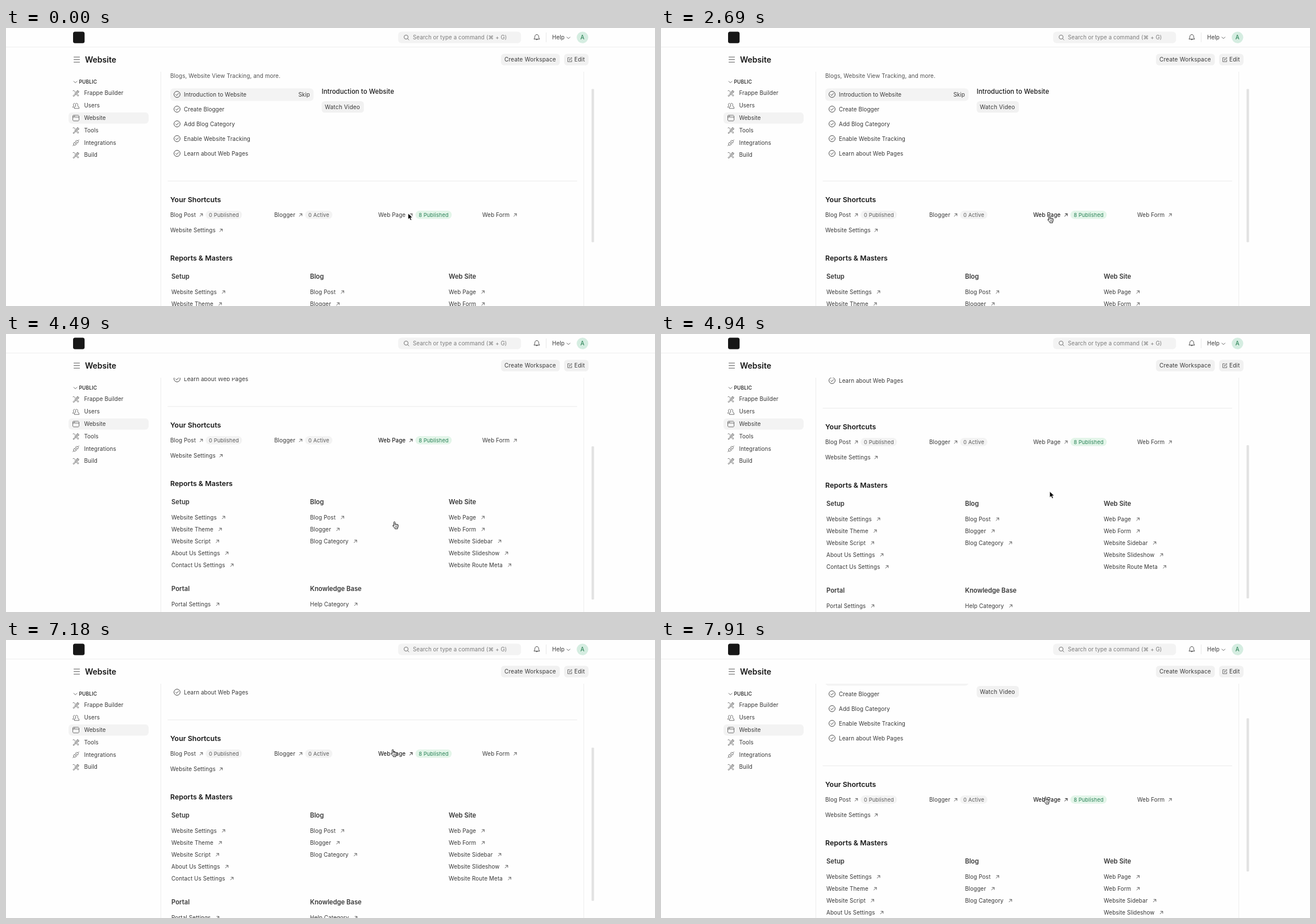
An HTML page for the animation above (8000 ms loop, 1142 px wide and 490 px high).

```html
<!DOCTYPE html>
<html lang="en">
<head>
<meta charset="utf-8">
<title>Website workspace</title>
<style>
  html, body { margin: 0; width: 100%; height: 100%; overflow: hidden; background: #fefefe; }
  svg { display: block; width: 100vw; height: 100vh; }
  text { font-family: Inter, "Noto Sans", sans-serif; white-space: pre; }
</style>
</head>
<body>
<svg id="stage" viewBox="0 0 1142 490" xmlns="http://www.w3.org/2000/svg"></svg>
<script>
const LOOP = 8000, STEP = 149.3;
const INK = '#383838', DARK = '#171717', PALE = '#f3f3f3', LINE = '#ebebeb';
const BODY = { size: 9.85, weight: 420, fill: INK, spacing: 0.1, anchor: 'start' };
const STRONG = { weight: 440 };
const BADGE = { size: 9.25, weight: 440, spacing: 0.12 };

// Text is placed by its left edge and the middle of its capitals.
function label(x, y, string, style) {
  const { size, weight, fill, spacing, anchor } = { ...BODY, ...style };
  return `<text x="${x}" y="${y + size * 0.365}" font-size="${size}" font-weight="${weight}" ` +
    `fill="${fill}" letter-spacing="${spacing}" text-anchor="${anchor}">${string}</text>`;
}

const pen = document.createElement('canvas').getContext('2d');
function textWidth(string, style) {
  const { size, weight, spacing } = { ...BODY, ...style };
  pen.font = `${weight} ${size * 10}px Inter, "Noto Sans", sans-serif`;
  return pen.measureText(string).width / 10 + string.length * spacing;
}

const heading = (x, y, string, size) =>
  label(x, y, string, { size, weight: 600, fill: size > 12 ? DARK : INK, spacing: 0 });
const box = (x, y, w, h, r, fill) =>
  `<rect x="${x}" y="${y}" width="${w}" height="${h}" rx="${r}" fill="${fill}"/>`;
const ring = (x, y, r, color = INK) =>
  `<circle cx="${x}" cy="${y}" r="${r}" fill="none" stroke="${color}" stroke-width="0.9"/>`;
const stroke = (d, color = INK, width = 0.9, at = [0, 0]) =>
  `<path d="${d}" transform="translate(${at})" fill="none" stroke="${color}" stroke-width="${width}" ` +
  'stroke-linecap="round" stroke-linejoin="round"/>';
const chevron = (x, y) => stroke('M-2.8-1.4L0 1.4 2.8-1.4', '#555', 0.9, [x, y]);
const arrow = (x, y, color = '#444') =>
  stroke('M-2.3 2.3L2.2-2.2M-1.4-2.3H2.3V1.4', color, 0.85, [x, y]);
const button = (x, y, w, textX, string) =>
  box(x, y, w, 20.3, 5.5, '#f1f1f1') + label(textX, y + 10.1, string, { size: 10, spacing: 0.2 });

// A text link with its arrow a fixed gap behind the last letter.
function link(x, y, name, gap, style = {}) {
  return label(x, y, name, style) + arrow(x + textWidth(name, style) + gap, y + 0.4, style.fill);
}

function badge(x, y, string, fill, ink) {
  return box(x, y - 7.2, textWidth(string, BADGE) + 11.3, 14.4, 7.2, fill) +
    label(x + 5.7, y, string, { ...BADGE, fill: ink });
}

const ICONS = {
  tools: 'M1 1.5L2.5 1 10.8 9.5 9.7 11 4 5M7 4.5Q6.5 1 10 1L8.4 2.7 9.4 3.8 11.1 2.3Q11.5 5.5 8 5.2M5.2 6.3L1 10.5 2 11.5 6.4 7.5',
  users: 'M5.6 6.4C3.5 0 11 0 9 6.4Q11.7 7 11.7 10.8H3.2Q3.2 7 5.6 6.4M4 2C1 1 1 5 2.5 6.2Q.5 7 .5 8.8H2',
  window: 'M1.8 1H10.2L11.5 2.3V9.7L10.2 11H1.8L.5 9.7V2.3ZM.5 4.2H11.5M2.2 2.6H4.1',
  plug: 'M.6 11.4L2.2 9.8Q.6 7.7 3.3 5.1L6.9 8.7Q4.3 11.4 2.2 9.8M4.5 5.8L5.7 4.6M6.2 7.5L7.4 6.3M11.4.6L9.8 2.2Q7.7.6 5.3 3.1L8.9 6.7Q11.4 4.3 9.8 2.2'
};

function topBar() {
  return box(0, 33.2, 1142, 0.9, 0, LINE) +
    box(118, 6.5, 20.3, 20.3, 3.5, DARK) +
    box(690, 6.5, 216.3, 20.3, 6, PALE) +
    ring(704, 16, 3.6, '#666') + stroke('M706.7 18.7L709 21', '#666') +
    label(716, 16.7, 'Search or type a command (⌘ + G)', { size: 9.7, fill: '#7c7c7c' }) +
    stroke('M929.3 19.3Q930.6 18 930.6 15.4C930.6 10.3 937.4 10.3 937.4 15.4Q937.4 18 938.7 19.3ZM932.5 19.5Q934 23 935.5 19.5') +
    box(950, 8, 0.9, 17, 0, '#e6e6e6') +
    label(961, 16.7, 'Help', STRONG) + chevron(989.7, 17.4) +
    '<circle cx="1014.4" cy="16.6" r="10.2" fill="#d5ede1"/>' +
    label(1014.4, 16.7, 'A', { weight: 480, fill: '#36895f', anchor: 'middle' });
}

function titleRow() {
  return stroke('M119.5 51.2h10m-10 4.5h10m-10 4.5h10', '#444') +
    heading(139, 55.7, 'Website', 14) +
    button(871, 45.5, 103.5, 877, 'Create Workspace') +
    button(982, 45.5, 43, 1000, 'Edit') +
    stroke('M991.5 52.4H988.5V59.4H995.5V56.4M991.3 56.6V55.3L994.8 51.8 996 53 992.5 56.6Z', INK, 0.7);
}

function sidebar() {
  const items = [['Frappe Builder', 'tools'], ['Users', 'users'], ['Website', 'window'],
    ['Tools', 'tools'], ['Integrations', 'plug'], ['Build', 'tools']];
  return chevron(122, 95.3) +
    label(128.5, 94.5, 'PUBLIC', { size: 8.5, weight: 460, fill: DARK, spacing: 0.15 }) +
    box(110, 148.8, 141, 19.8, 6, PALE) +
    items.map(([name, icon], i) => {
      const y = 114.8 + i * 21.8;
      return label(137.4, y, name) + stroke(ICONS[icon], '#444', 0.75, [117, y - 5.6]);
    }).join('');
}

function onboarding() {
  const steps = ['Introduction to Website', 'Create Blogger', 'Add Blog Category',
    'Enable Website Tracking', 'Learn about Web Pages'];
  return label(289, 84.5, 'Blogs, Website View Tracking, and more.', { fill: '#525252' }) +
    box(289, 106.5, 252.3, 22, 6, PALE) +
    steps.map((name, i) => {
      const y = 117.5 + i * 26;
      return ring(301, y - 0.5, 5.4) + stroke('M-2.4.2L-.7 1.9 2.6-1.8', INK, 0.9, [301, y - 0.5]) +
        label(313, y, name);
    }).join('') +
    label(514.4, 117.5, 'Skip') +
    label(555.5, 112, 'Introduction to Website', { size: 11.25, weight: 450, fill: DARK }) +
    button(555.5, 129, 74.3, 561, 'Watch Video') +
    box(284.5, 269.4, 720.5, 0.9, 0, '#e8e8e8');
}

function shortcuts() {
  const gap = 9.5;
  const links = [['Blog Post', '0 Published'], ['Blogger', '0 Active'], ['Web Page', '8 Published'],
    ['Web Form'], ['Website Settings']];
  return heading(289, 302.5, 'Your Shortcuts', 12.4) + links.map(([name, count], i) => {
    const x = 289 + i % 4 * 183, y = 329.3 + Math.floor(i / 4) * 27;
    const pill = name === 'Web Page' ? ['#e3f5e9', '#2a8257'] : [PALE, '#5a5a5a'];
    const row = link(x, y, name, gap, STRONG);
    return (name === 'Web Page'
      ? `<g id="idle">${row}</g><g id="hover">${link(x, y, name, gap, { ...STRONG, fill: '#000' })}</g>`
      : row) + (count ? badge(x + textWidth(name, STRONG) + gap + 7.8, y, count, ...pill) : '');
  }).join('');
}

function reports() {
  const cards = [
    ['Setup', 'Website Settings', 'Website Theme', 'Website Script', 'About Us Settings', 'Contact Us Settings'],
    ['Blog', 'Blog Post', 'Blogger', 'Blog Category'],
    ['Web Site', 'Web Page', 'Web Form', 'Website Sidebar', 'Website Slideshow', 'Website Route Meta'],
    ['Portal', 'Portal Settings'],
    ['Knowledge Base', 'Help Category']
  ];
  return heading(289, 405, 'Reports &amp; Masters', 12.4) + cards.map(([title, ...names], i) => {
    const x = 291 + i % 3 * 244, y = 438 + Math.floor(i / 3) * 153;
    return heading(x, y, title, 11.25) +
      names.map((name, row) => link(x, y + 27.1 + row * 21, name, 12)).join('');
  }).join('');
}

const POINTER = '<path id="pointer" d="M0 0V10.6L2.5 8.3 4.2 12.3 6.2 11.4 4.5 7.5H7.9Z" ' +
  'fill="#000" stroke="#fff" stroke-width="0.8" stroke-linejoin="round"/>';
const HAND = '<g id="hand" fill="#fff" stroke="#000" stroke-width="0.9" stroke-linejoin="round" stroke-linecap="round">' +
  '<path d="M2.4 7.8V1.6Q3.5-.8 4.6 1.6V5.2Q5.6 4.3 6.5 5.4 7.6 4.7 8.4 5.8 10.1 5.4 10.2 7.2V9.5L9 12.3V13.4H4.3V12.4L.6 8.4Q.5 6 2.4 7.8Z"/>' +
  '<path d="M4.6 5.2v2m1.9-1.6v1.8m1.9-1.4v1.6M5 9v2.2M6.6 9v2.2M8.2 9v2.2" stroke-width="0.6"/></g>';

const stage = document.getElementById('stage');
stage.innerHTML =
  '<defs><clipPath id="view"><rect y="77" width="1142" height="413"/></clipPath></defs>' +
  box(0, 0, 1142, 490, 0, '#fefefe') + topBar() + titleRow() + sidebar() +
  box(272, 77, 0.9, 413, 0, LINE) + box(1016.3, 77, 0.9, 413, 0, LINE) +
  `<g clip-path="url(#view)"><g id="content">${onboarding()}${shortcuts()}${reports()}</g></g>` +
  '<rect id="thumb" x="1030.4" width="4.3" height="270" rx="1" fill="#e2e2e2"/>' +
  POINTER + HAND;

const part = Object.fromEntries(['content', 'thumb', 'idle', 'hover', 'pointer', 'hand']
  .map(id => [id, document.getElementById(id)]));

// Key points as [step, value], joined by straight moves.
const SCROLL = [[27, 0], [28, 2], [30, 142], [31, 142], [32, 139], [47, 139], [48, 129], [50, 72], [53, 48]];
const CURSOR_X = [[0, 707.5], [4, 694], [10, 680], [31, 680], [32, 684], [37, 684], [38, 677], [50, 677], [53, 673]];
const CURSOR_Y = [[0, 326.8], [4, 319], [8, 330], [31, 330], [36, 199], [38, 192.3], [50, 192.3], [53, 275.8]];

function valueAt(points, step) {
  const next = points.findIndex(point => point[0] > step);
  if (next < 0) return points[points.length - 1][1];
  if (next === 0) return points[0][1];
  const [[s0, v0], [s1, v1]] = points.slice(next - 1, next + 1);
  return v0 + (v1 - v0) * (step - s0) / (s1 - s0);
}

const overLink = step => step >= 1 && step < 32 || step >= 38 && step < 51 || step >= 53;

function show(element, visible) {
  element.setAttribute('visibility', visible ? 'visible' : 'hidden');
}

function draw(time) {
  const step = Math.floor((time + 8) / STEP);
  const scroll = valueAt(SCROLL, step);
  const active = overLink(step);
  const place = `translate(${valueAt(CURSOR_X, step)} ${valueAt(CURSOR_Y, step)})`;
  part.content.setAttribute('transform', `translate(0 ${-scroll})`);
  part.thumb.setAttribute('y', 107.5 + scroll * 0.637);
  show(part.idle, !active);
  show(part.hover, active);
  show(part.pointer, !active);
  show(part.hand, active);
  part.pointer.setAttribute('transform', place);
  part.hand.setAttribute('transform', place);
}

const start = performance.now();
function tick() {
  draw((performance.now() - start) % LOOP);
  requestAnimationFrame(tick);
}
tick();
</script>
</body>
</html>
```
